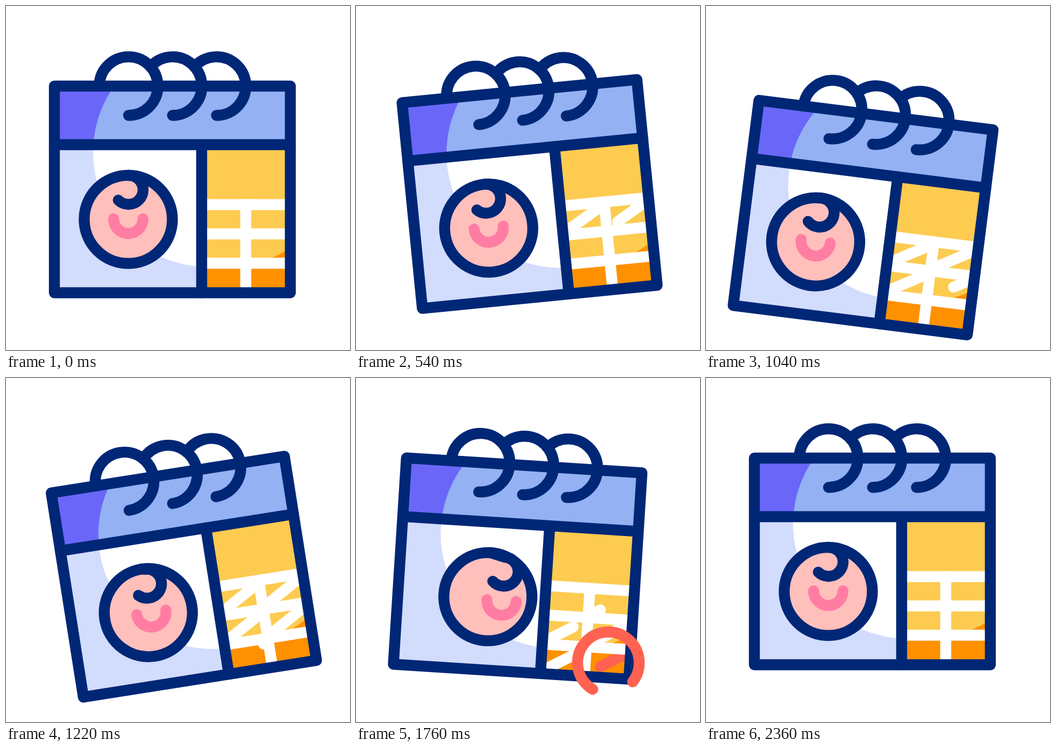
These frames come from a looping animation (640x640 px, 2400 ms). An HTML page with a canvas:

```html
<!DOCTYPE html>
<html lang="en">
<head>
<meta charset="utf-8">
<title>Calendar</title>
<style>
  html, body { margin: 0; width: 100%; height: 100%; overflow: hidden; background: #fff; }
  canvas { display: block; width: 640px; height: 640px; }
</style>
</head>
<body>
<canvas id="stage" width="640" height="640"></canvas>
<script>
const ctx = document.getElementById('stage').getContext('2d');
const LOOP = 2400, BEAT = 360, LINE = 20.4, TAU = Math.PI * 2;
const NAVY = '#002776', PURPLE = '#6a67f8', BLUE = '#93b1f3', LAVENDER = '#d2dcfd',
      YELLOW = '#fdcb50', ORANGE = '#ff9100', SKIN = '#ffbfbb', PINK = '#ff7da3',
      RED = '#ff6251', WHITE = '#fff';

// The calendar turns about the middle of its header
const PIVOT = { x: 309.5, y: 203.5 };

// Turning points of the motion: heights fall on the beat, tilts are [time, degrees]
const BOUNCE = [0, 50, -31, 56, -21.8, 14.6, 0].map((y, i) => [i * BEAT, y]);
const TILT = [[0, 0], [BEAT, -13.1], [890, 15.5], [1285, -10.6], [1575, 4.7], [2160, 0]];

const DAY = { x: 82.5, y: 54.5 };

const progress = (t, start, duration) => Math.min(1, Math.max(0, (t - start) / duration));
const ease = u => (1 - Math.cos(Math.PI * u)) / 2;

// Sum of eased steps from each turning point to the next
function sway(points, t) {
  return points.slice(1).reduce((value, [time, target], i) => {
    const [from, previous] = points[i];
    return value + (target - previous) * ease(progress(t, from, time - from));
  }, points[0][1]);
}

function rect(x0, y0, x1, y1, color) {
  ctx.fillStyle = color;
  ctx.fillRect(x0, y0, x1 - x0, y1 - y0);
}

function disc(x, y, r, color) {
  ctx.fillStyle = color;
  ctx.beginPath();
  ctx.arc(x, y, r, 0, TAU);
  ctx.fill();
}

function line(color, ...points) {
  ctx.strokeStyle = color;
  ctx.beginPath();
  points.forEach(([x, y]) => ctx.lineTo(x, y));
  ctx.stroke();
}

function arc(color, x, y, r, from, to, ccw = false) {
  ctx.strokeStyle = color;
  ctx.beginPath();
  ctx.arc(x, y, r, from, to, ccw);
  ctx.stroke();
}

function clipped(x0, y0, x1, y1, draw) {
  ctx.save();
  ctx.beginPath();
  ctx.rect(x0, y0, x1 - x0, y1 - y0);
  ctx.clip();
  draw();
  ctx.restore();
}

// Panel whose base colour shows outside a large round highlight
function litPanel(x0, y0, x1, y1, base, light, cx) {
  rect(x0, y0, x1, y1, base);
  clipped(x0, y0, x1, y1, () => disc(cx, 272, 213, light));
}

// Diagonal stroke through one day, drawn and wiped in reading order
function strikeDay(i, t) {
  const wipe = 1333 + 145 * i;
  const head = progress(t, Math.max(0, 314 * i - 115), 480);
  const tail = progress(t, wipe, Math.min(400, 2350 - wipe));
  if (head <= tail) return;
  const x = 405 + (i % 2) * DAY.x, y = 397 + Math.floor(i / 2) * DAY.y;
  const at = p => [x + 94 * (0.5 - p), y - DAY.y * (0.5 - p)];
  line(i === 5 ? RED : WHITE, at(tail), at(head));
}

function drawDays(t) {
  litPanel(364, 258, 529, 533, ORANGE, YELLOW, 412);
  clipped(364, 258, 529, 533, () => {
    for (let i = 0; i < 6; i++) strikeDay(i, t);
    for (let row = 0; row < 3; row++) {
      const y = 369.5 + row * DAY.y;
      line(WHITE, [364, y], [529, y]);
    }
    line(WHITE, [446, 369.5], [446, 533]);
  });
}

// The face leans towards the days, its features a little further
function drawFace(t) {
  const lean = 30 * (ease(progress(t, 1100, 400)) - ease(progress(t, 1860, 400)));
  const dx = lean * 0.86, dy = lean * 0.22;
  ctx.save();
  ctx.translate(227.5 + lean, 397);
  disc(0, 0, 82, SKIN);
  arc(PINK, dx, dy - 1, 27.3, 0, Math.PI);
  ctx.strokeStyle = NAVY;
  ctx.beginPath();
  ctx.moveTo(0, -82);
  ctx.arc(dx + 0.5, dy - 55, 27, -Math.PI / 2, Math.PI * 0.75);
  ctx.stroke();
  arc(NAVY, 0, 0, 82, 0, TAU);
  ctx.restore();
}

function drawFrame() {
  ctx.strokeStyle = NAVY;
  ctx.strokeRect(90, 149, 439, 384.5);
  line(NAVY, [90, 258], [529, 258]);
  line(NAVY, [364, 258], [364, 533.5]);
  for (let i = 0; i < 3; i++) {
    const start = Math.PI + (i ? 0.72 : 0);
    arc(NAVY, 228 + i * 81.8, 149, 54.5, start, TAU + Math.PI / 2);
  }
}

function drawMark(t) {
  const head = progress(t, 1310, 477), tail = progress(t, 1660, 580);
  if (head <= tail) return;
  const start = TAU * 0.27;
  arc(RED, 489, 505.5, 57.3, start - TAU * tail, start - TAU * head, true);
}

function render(t) {
  ctx.setTransform(1, 0, 0, 1, 0, 0);
  rect(0, 0, 640, 640, WHITE);
  ctx.lineWidth = LINE;
  ctx.lineCap = ctx.lineJoin = 'round';
  ctx.translate(PIVOT.x, PIVOT.y + sway(BOUNCE, t));
  ctx.rotate(sway(TILT, t) * Math.PI / 180);
  ctx.translate(-PIVOT.x, -PIVOT.y);

  litPanel(90, 149, 529, 258, PURPLE, BLUE, 375);
  litPanel(90, 258, 364, 533, LAVENDER, WHITE, 375);
  drawDays(t);
  drawFace(t);
  drawFrame();
  drawMark(t);
}

const origin = performance.now();
function tick() {
  render((performance.now() - origin) % LOOP);
  requestAnimationFrame(tick);
}
tick();
</script>
</body>
</html>
```
